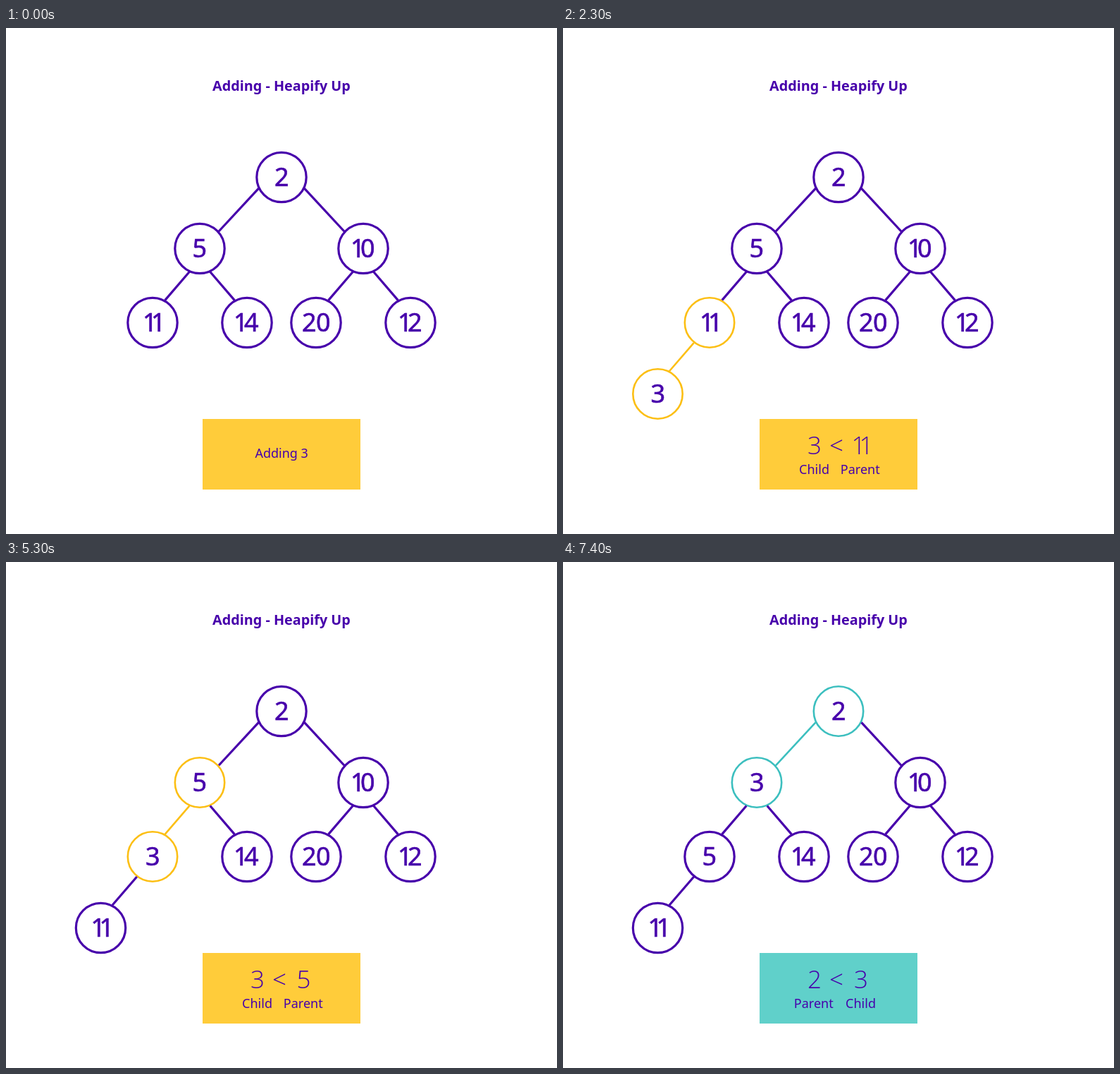
An HTML page with a canvas that plays this animation: 782x717 px, repeating every 8000 ms.

```html
<!DOCTYPE html>
<html lang="en">
<head>
<meta charset="utf-8">
<title>Heapify Up</title>
<style>
  html, body { margin: 0; width: 100%; height: 100%; overflow: hidden; background: #fff; }
  canvas { display: block; }
</style>
</head>
<body>
<canvas id="stage" width="782" height="717"></canvas>
<script>
const ctx = document.getElementById('stage').getContext('2d');
const LOOP = 8000, INTRO = 500, COMPARE = 3000;
const PURPLE = '#4700ab';
const AMBER = { line: '#fcbf14', fill: '#ffcc3a' };
const TEAL = { line: '#3cbfbf', fill: '#60d0ca' };
const SANS = '"Noto Sans", sans-serif';
const LIGHT = '"Open Sans", "Noto Sans", sans-serif';
const RADIUS = 35.2;
const START_HEAP = [2, 5, 10, 11, 14, 20, 12];
const ADDED = 3;

// Per level: height, distance beside the parent, and the angles from vertical
// (in degrees) at which an edge leaves the parent and enters the child.
const LEVELS = [
  { y: 211.5 },
  { y: 312.5, spread: 116, leave: 64, enter: 48 },
  { y: 417.5, spread: 67, leave: 24, enter: 29 },
  { y: 518.5, spread: 73.5, leave: 38, enter: 27 }
];

const parentOf = i => (i - 1) >> 1;
const sideOf = i => i % 2 ? -1 : 1;
const levelOf = i => LEVELS[Math.floor(Math.log2(i + 1))];

function nodeAt(i) {
  const { y, spread } = levelOf(i);
  return { x: i ? nodeAt(parentOf(i)).x + sideOf(i) * spread : 391, y };
}

// Centres the visible ink of a string on x.
function label(text, x, baseline, font) {
  ctx.font = font;
  const m = ctx.measureText(text);
  ctx.fillText(text, x + (m.actualBoundingBoxLeft - m.actualBoundingBoxRight) / 2, baseline);
}

// Sets digits with an even gap between their ink, centred on x.
function number(value, x, baseline, size, font, thicken = 0) {
  ctx.font = font;
  const gap = size * 0.06;
  const digits = [...String(value)].map(text => {
    const m = ctx.measureText(text);
    return { text, left: m.actualBoundingBoxLeft, ink: m.actualBoundingBoxLeft + m.actualBoundingBoxRight };
  });
  const width = digits.reduce((sum, d) => sum + d.ink + gap, -gap);
  let pos = x - width / 2;
  for (const d of digits) {
    ctx.fillText(d.text, pos + d.left, baseline);
    if (thicken) {
      ctx.strokeStyle = PURPLE;
      ctx.lineWidth = thicken;
      ctx.strokeText(d.text, pos + d.left, baseline);
    }
    pos += d.ink + gap;
  }
}

// The heap after a number of upward swaps; count -1 is before the insertion.
function heapAfter(count) {
  const heap = [...START_HEAP];
  if (count < 0) return { heap, color: AMBER };
  let child = heap.push(ADDED) - 1;
  for (; count > 0; count--) {
    const parent = parentOf(child);
    [heap[child], heap[parent]] = [heap[parent], heap[child]];
    child = parent;
  }
  const parent = parentOf(child);
  const settled = heap[parent] < heap[child];
  return { heap, child, parent, settled, color: settled ? TEAL : AMBER };
}

function pen(state, lit) {
  ctx.strokeStyle = lit ? state.color.line : PURPLE;
  ctx.lineWidth = lit ? 2.6 : 3.2;
}

function drawEdge(i) {
  const { leave, enter } = levelOf(i);
  const from = nodeAt(parentOf(i)), to = nodeAt(i), side = sideOf(i);
  const a = leave * Math.PI / 180, b = enter * Math.PI / 180, r = RADIUS + 1;
  ctx.beginPath();
  ctx.moveTo(from.x + side * r * Math.sin(a), from.y + r * Math.cos(a));
  ctx.lineTo(to.x - side * r * Math.sin(b), to.y - r * Math.cos(b));
  ctx.stroke();
}

function drawTree(state) {
  state.heap.forEach((value, i) => {
    if (i) {
      pen(state, i === state.child);
      drawEdge(i);
    }
    const { x, y } = nodeAt(i);
    pen(state, i === state.child || i === state.parent);
    ctx.beginPath();
    ctx.arc(x, y, RADIUS, 0, Math.PI * 2);
    ctx.stroke();
    number(value, x, y + 12.8, 36, `36px ${SANS}`, 0.6);
  });
}

function drawBox({ heap, child, parent, settled, color }) {
  ctx.fillStyle = color.fill;
  ctx.fillRect(279, 554, 224, 100);
  ctx.fillStyle = PURPLE;
  const small = `18px ${SANS}`;
  if (child === undefined) return label(`Adding ${ADDED}`, 391, 609, small);

  const sides = [[heap[child], 'Child'], [heap[parent], 'Parent']];
  if (settled) sides.reverse();
  const big = `300 35px ${LIGHT}`;
  sides.forEach(([value, role], i) => {
    const x = 356.5 + i * 66;
    number(value, x, 603.5, 35, big);
    label(role, x, 632, small);
  });
  label('<', 388, 603.5, big);
}

function render(time) {
  const state = heapAfter(Math.floor((time % LOOP - INTRO) / COMPARE));
  ctx.fillStyle = '#fff';
  ctx.fillRect(0, 0, 782, 717);
  ctx.fillStyle = PURPLE;
  label('Adding - Heapify Up', 390.7, 89, `bold 19.8px ${SANS}`);
  drawTree(state);
  drawBox(state);
}

const begin = performance.now();
function tick() {
  render(performance.now() - begin);
  requestAnimationFrame(tick);
}
tick();
</script>
</body>
</html>
```
